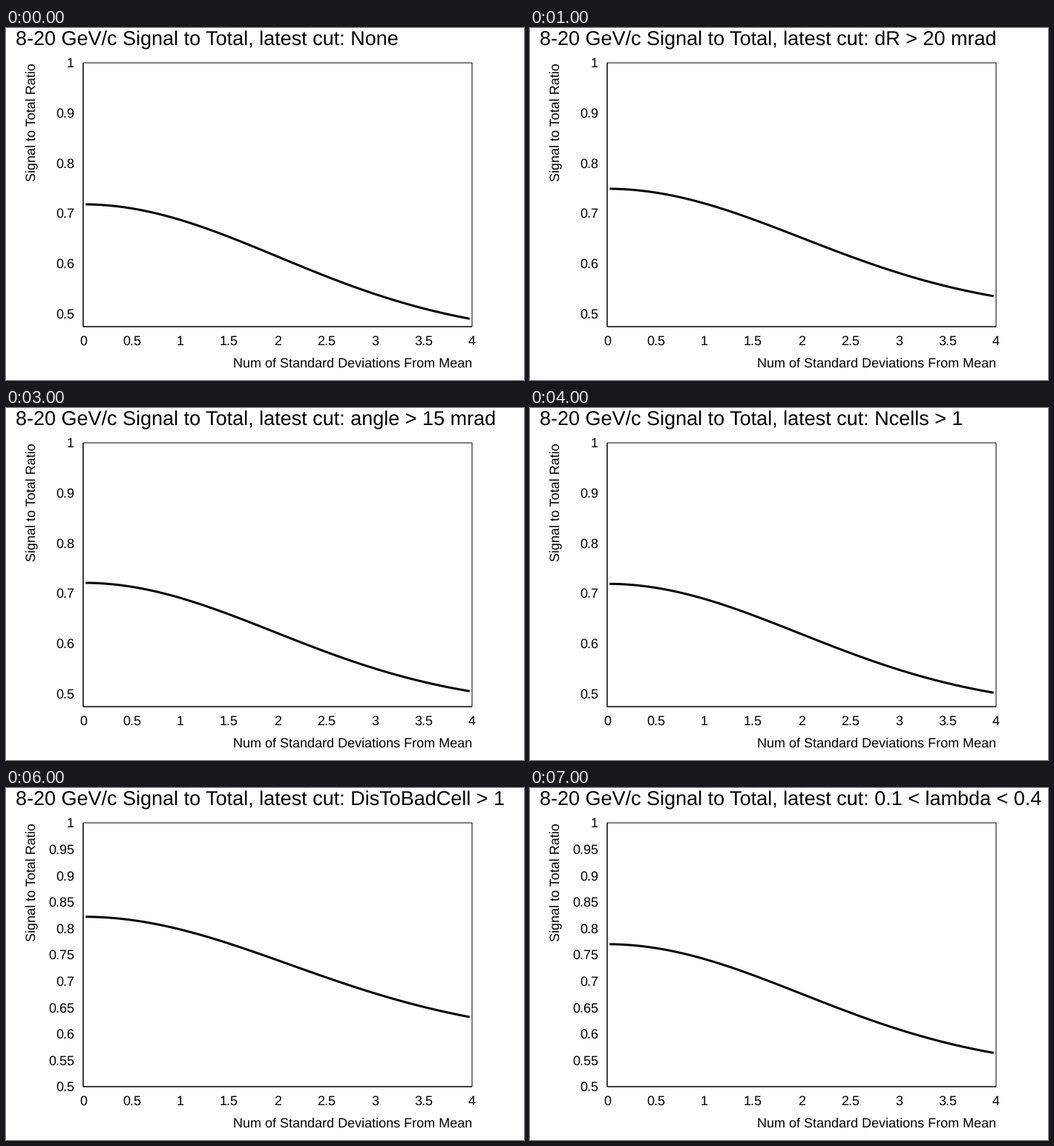
Animation of 698 by 475 pixels, one loop 8 s. Source, as a matplotlib script:

```python
import numpy as np
import matplotlib.pyplot as plt
from matplotlib.animation import FuncAnimation

W, H, DPI = 698, 475, 64
LEFT, RIGHT, TOP, BOTTOM = 104, 628, 47, 403
SIGMAS = 4

plt.rcParams["font.family"] = "Liberation Sans"
plt.rcParams["text.hinting"] = "none"

# cut name, ratio at 0, ratio at 4, spread of the fall-off
CUTS = [
    ("None", 0.718, 0.490, 8),
    ("dR > 20 mrad", 0.749, 0.535, 8),
    ("asymmetry < 0.7", 0.749, 0.535, 8),
    ("angle > 15 mrad", 0.721, 0.505, 7.7),
    ("Ncells > 1", 0.719, 0.502, 7.8),
    ("DisToBorder > 2", 0.753, 0.544, 8),
    ("DisToBadCell > 1", 0.822, 0.632, 9),
    ("0.1 < lambda < 0.4", 0.770, 0.564, 8),
]

fig = plt.figure(figsize=(W / DPI, H / DPI), dpi=DPI, facecolor="white")
ax = fig.add_axes([0, 0, 1, 1])
ax.set(xlim=(0, W), ylim=(H, 0))
ax.axis("off")


def px(n):
    return n * 72 / DPI


def label(x, y, text, size=18, **kw):
    return ax.text(x, y, text, fontsize=px(size), color="black",
                   va="baseline", **kw)


def stroke(xs, ys, width=1):
    return ax.plot(xs, ys, color="black", lw=px(width), snap=False,
                   solid_capstyle="butt", solid_joinstyle="miter")[0]


def to_x(n):
    return LEFT + n * (RIGHT - LEFT) / SIGMAS


def to_y(ratio, low):
    return TOP + (1 - ratio) / (1 - low) * (BOTTOM - TOP)


def ratio_at(n, start, end, spread):
    fall = 1 - np.exp(-n**2 / spread)
    return start + (end - start) * fall / fall[-1]


# frame, then the two axes drawn over it
stroke([LEFT, RIGHT, RIGHT, LEFT, LEFT], [TOP, TOP, BOTTOM, BOTTOM, TOP])
stroke([LEFT, LEFT, RIGHT], [TOP, BOTTOM, BOTTOM])

for n in np.arange(0, SIGMAS + 0.5, 0.5):
    label(to_x(n), 428, f"{n:g}", ha="center")
label(RIGHT, 458, "Num of Standard Deviations From Mean", ha="right")
label(39, TOP, "Signal to Total Ratio", ha="right",
      rotation=90, rotation_mode="anchor")

title = label(13, 23, "", 27, ha="left")
line = stroke([], [], 3)
ticks = [label(92, 0, "", ha="right") for _ in range(11)]
bins = np.arange(0.025, SIGMAS, 0.05)


def update(i):
    cut, start, end, spread = CUTS[i]
    # the axis fits the data: high curves get a round lower limit and finer ticks
    low, step = (0.5, 0.05) if end > 0.55 else (0.4742, 0.1)
    title.set_text(f"8-20 GeV/c Signal to Total, latest cut: {cut}")
    line.set_data(to_x(bins), to_y(ratio_at(bins, start, end, spread), low))
    for k, tick in enumerate(ticks):
        value = 1 - k * step
        tick.set_text(f"{value:.3g}" if value > low - 1e-6 else "")
        tick.set_y(to_y(value, low) + 6.2)
    return [title, line, *ticks]


anim = FuncAnimation(fig, update, frames=len(CUTS), interval=1000,
                     repeat=True, repeat_delay=0)
plt.show()
```
